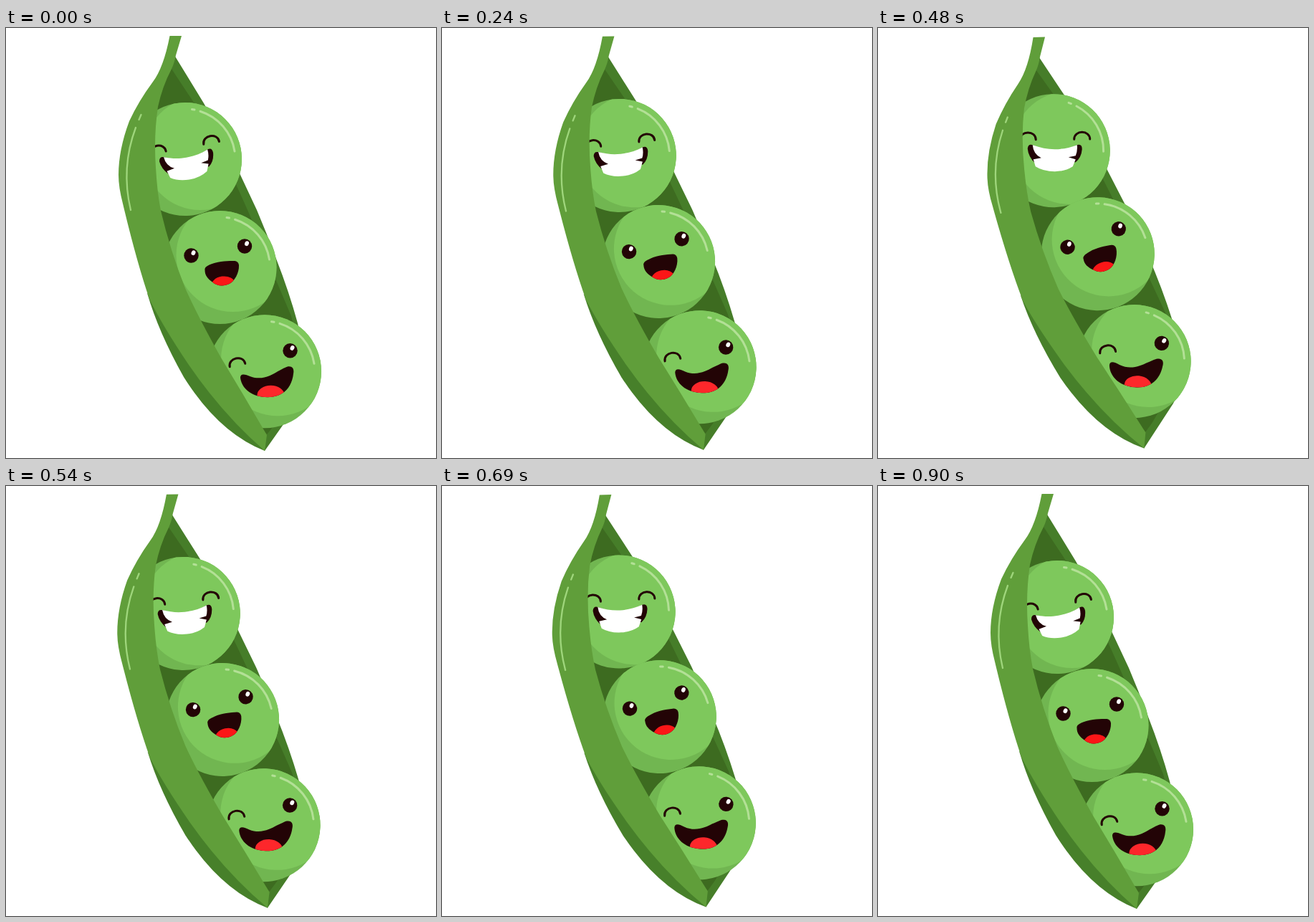
Write an HTML page that moves like this. It is 600x600 px and loops after 930 ms.

```html
<!DOCTYPE html>
<html lang="en">
<head>
<meta charset="utf-8">
<title>Peas in a pod</title>
<style>
  html, body { margin: 0; width: 100%; height: 100%; overflow: hidden; background: #fff; }
  svg { display: block; width: 100vw; height: 100vh; }
  .line { fill: none; stroke-linecap: round; }
  .ink { fill: #230406; }
  .wink { stroke: #230406; stroke-width: 3; }
  .shine { stroke: #b3e096; stroke-width: 3; }
  .shade { fill: #71b651; }
  .light { fill: #7ec85c; clip-path: url(#round); }
</style>
</head>
<body>
<svg viewBox="0 0 600 600">
  <defs>
    <clipPath id="round"><circle r="79"/></clipPath>
    <path id="laugh" d="M-21 4C-22-1-16-3-11-5C0-9 12-9 21-9Q26-8 26.5-3C27 8 20 20 13 23C5 27-4 26-10 21C-17 16-21 11-21 4Z"/>
    <path id="grin" d="M-34 9C-34 2-27 4-20 7C-4 13 10 5 18 0C28-5 30-7 34-7C40-7 41-2 40 3C38 22 26 36 4 36C-18 36-32 24-34 9Z"/>
    <clipPath id="laughClip"><use href="#laugh"/></clipPath>
    <clipPath id="grinClip"><use href="#grin"/></clipPath>
    <path id="shine" class="line shine" d="M9.5-69.5l3.5 .6M21-66.8A70 70 0 0 1 69-11"/>
    <g id="ball">
      <circle class="shade" r="79"/>
      <g class="light"><circle cx="18" cy="-17" r="79"/></g>
      <use href="#shine"/>
    </g>
    <g id="eye">
      <circle class="ink" r="10.2"/>
      <ellipse cx="3" cy="-3.8" rx="2.8" ry="3.5" fill="#fff" transform="rotate(25 3 -3.8)"/>
    </g>
    <path id="wink" class="line wink" d="M-11 0C-11-13 11-13 11 0"/>
  </defs>

  <g class="pod">
    <path fill="#467d29" d="M235 38L276 105Q304 154 327 205L350 254Q364 287 377 322Q395 368 407 412Q420 460 416 495Q413 515 404 529L361 590L280 470L200 260L208 100Z"/>
    <path fill="#3d6b20" d="M231 57L262 104Q292 155 318 212Q352 285 376 350L398 402Q408 440 402 480Q396 530 364 567L280 470L200 260L208 100Z"/>
  </g>

  <g class="pea">
    <circle class="shade" r="79"/>
    <g class="light"><circle cx="21" cy="-8" r="79"/></g>
    <use href="#shine"/>
    <g transform="rotate(-10)">
      <use href="#wink" x="40" y="-16"/>
      <use href="#wink" x="-35.5" y="-15.5"/>
      <path class="ink" d="M-36-3Q-35-10-29-8C-18-3-9-1 2-1C13-1 23-3 33-8Q40-10 40-2Q39 10 31 16L-26 17Q-35 8-36-3Z"/>
      <path fill="#fff" d="M-29-8C-18-4-9-2 2-2C13-2 23-4 33-8Q34 0 31 7L21 9L31 12L27 22Q16 29 2 29Q-14 29-25 22L-28 12L-17 10Q-28 5-29-8Z"/>
    </g>
  </g>
  <g class="pea">
    <use href="#ball"/>
    <use href="#eye" x="-40" y="-16.5"/>
    <use href="#eye" x="34.5" y="-29.5"/>
    <use href="#laugh" class="ink"/>
    <g clip-path="url(#laughClip)">
      <ellipse cx="4.5" cy="25" rx="17" ry="12.5" fill="#fb1617" transform="rotate(-8 4.5 25)"/>
    </g>
  </g>
  <g class="pea">
    <use href="#ball"/>
    <use href="#wink" transform="translate(-38 -8.7) rotate(-12)"/>
    <use href="#eye" x="35.5" y="-29"/>
    <use href="#grin" class="ink"/>
    <ellipse cx="8.5" cy="33" rx="19" ry="13.5" fill="#fd272b" clip-path="url(#grinClip)"/>
  </g>

  <g class="pod">
    <path fill="#47802a" d="M197 370Q213 425 248 487Q297 565 361 590L364 568L250 400Z"/>
    <path fill="#609e3a" d="M228.5 11H245L237 38Q235 49 231 57Q218 82 212 110Q206 150 209 195Q211 230 216 255Q229 310 250 363Q268 403 300 460L330 510L364 568L361 590Q303 540 255 470Q218 415 200 378Q182 325 163 245Q157 222 157 205Q157 170 172 130Q185 102 205 75Q220 55 228.5 11Z"/>
    <path class="line" stroke="#9fd67c" stroke-width="2.3" d="M188.5 121L185.5 128M181 139Q160 195 174 254"/>
  </g>
</svg>
<script>
  const LOOP = 930, STEP = 30, SWAY = 300;
  const pods = document.querySelectorAll('.pod');
  const peas = document.querySelectorAll('.pea');

  // Rest position, travel and turn of each pea
  const moves = [
    { x: 250, y: 183, dx: -2.8, dy: -6.3, turn: 5.5 },
    { x: 298.5, y: 334, dx: 4.4, dy: -10, turn: -5.4 },
    { x: 361, y: 479.2, dx: -1.8, dy: -7.5, turn: 3.2 }
  ];

  function draw(now) {
    const time = Math.floor(now % LOOP / STEP) * STEP;
    const phase = time / SWAY * 2 * Math.PI;
    const swing = 1 - Math.cos(phase);
    const hop = swing - 0.12 * Math.sin(phase); // peas trail the pod slightly

    pods.forEach(pod => pod.setAttribute('transform', `rotate(${-1.22 * swing} 275 322)`));
    moves.forEach(({ x, y, dx, dy, turn }, i) => peas[i].setAttribute('transform',
      `translate(${x + dx * hop} ${y + dy * hop}) rotate(${turn * swing})`));
    requestAnimationFrame(draw);
  }
  draw(performance.now());
</script>
</body>
</html>
```
